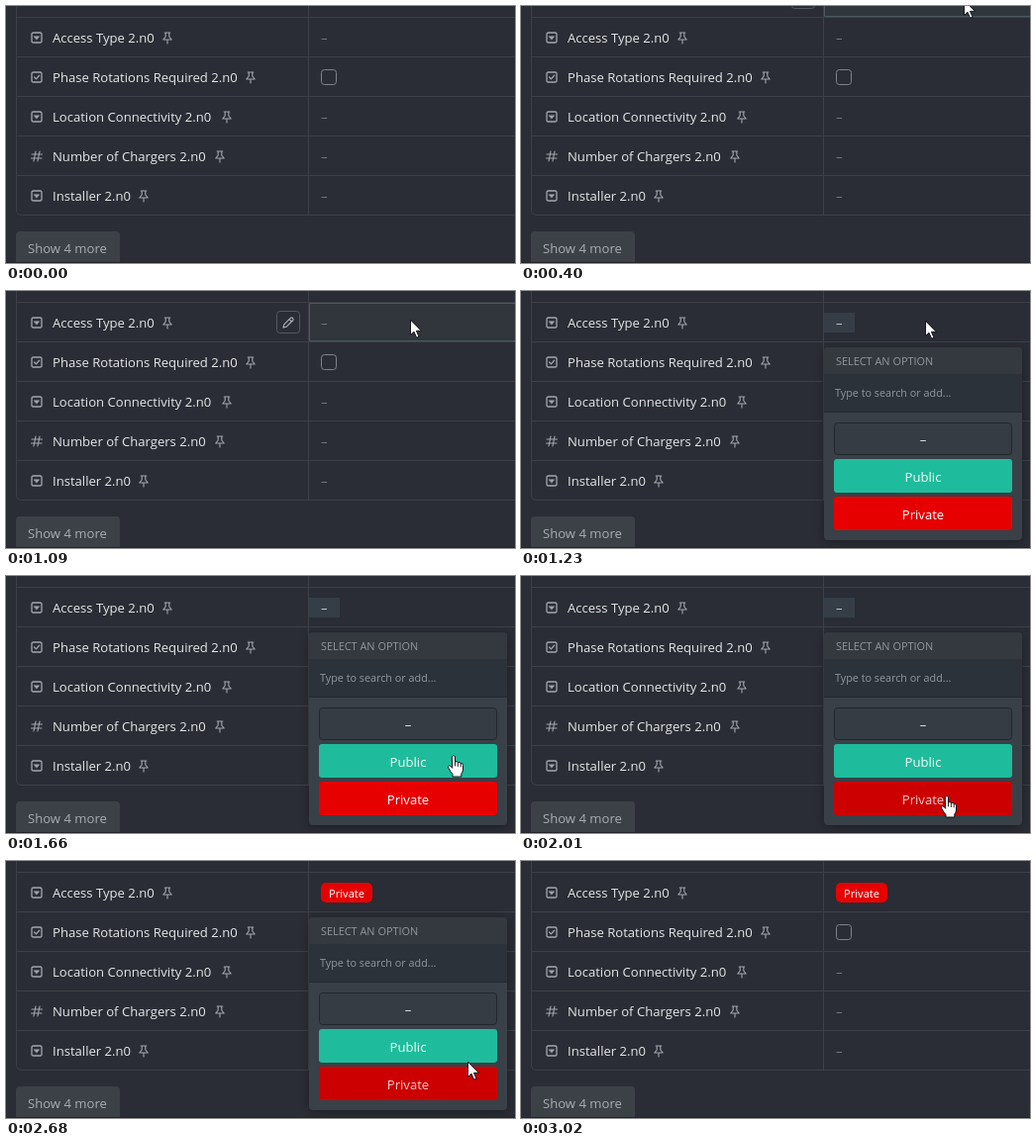
An HTML page with a canvas for the animation above (4.01 s loop, 514 by 260 pixels).

```html
<!DOCTYPE html>
<html lang="en">
<head>
<meta charset="utf-8">
<title>Field picker</title>
<style>
html, body { margin: 0; width: 100%; height: 100%; overflow: hidden; background: #2a2d35; }
canvas { display: block; }
</style>
</head>
<body>
<canvas id="stage" width="514" height="260"></canvas>
<script>
const ctx = document.getElementById('stage').getContext('2d');
const LOOP = 4010;
const SANS = '"Open Sans", "Noto Sans", sans-serif';
const BG = '#2a2d35', LINE = '#3d4047', ICON = '#a3a6ad';

const ROWS = [
  { label: 'Access Type 2.n0', icon: 'select', pin: 163 },
  { label: 'Phase Rotations Required 2.n0', icon: 'check', pin: 247 },
  { label: 'Location Connectivity 2.n0', icon: 'select', pin: 223 },
  { label: 'Number of Chargers 2.n0', icon: 'hash', pin: 216 },
  { label: 'Installer 2.n0', icon: 'select', pin: 139 }
];

const OPEN = 1230, PICK = 2540, CLOSE = 2750, LEAVE = 2820, UNHOVER = 3020;

// Pointer path: time, x, y
const PATH = [
  [190, 500, 188], [400, 447, -6], [470, 441, 13], [680, 417, 27], [880, 415, 27],
  [1090, 408, 29], [1230, 408, 30], [1370, 420, 80], [1510, 445, 146], [1660, 452, 184],
  [1940, 393, 222], [2010, 430, 222], [2410, 430, 222], [2540, 440, 217],
  [2680, 466, 203], [2750, 492, 192], [2820, 520, 188]
];

// Screen refreshes happen in bursts: first, last, count
const BURSTS = [[190, 680, 8], [880, 1370, 8], [1440, 1940, 8], [2010, 2010, 1],
  [2210, 2410, 3], [2540, 2820, 5], [3020, 3020, 1]];
const TICKS = [0];
for (const [a, b, n] of BURSTS)
  for (let i = 0; i < n; i++) TICKS.push(n > 1 ? Math.round((a + (b - a) * i / (n - 1)) / 10) * 10 : a);

function pointer(t) {
  let i = 0;
  while (i < PATH.length - 2 && PATH[i + 1][0] <= t) i++;
  const [t0, x0, y0] = PATH[i], [t1, x1, y1] = PATH[i + 1];
  const k = Math.min(1, Math.max(0, (t - t0) / (t1 - t0)));
  return { x: Math.round(x0 + (x1 - x0) * k), y: Math.round(y0 + (y1 - y0) * k) };
}

function text(s, x, y, color, size = 13.1, align = 'left', weight = 400) {
  ctx.font = `${weight} ${size}px ${SANS}`;
  ctx.textAlign = align;
  ctx.fillStyle = color;
  ctx.fillText(s, x, y);
}

function box(x, y, w, h, r, fill, stroke) {
  ctx.beginPath();
  ctx.roundRect(x, y, w, h, r);
  if (fill) { ctx.fillStyle = fill; ctx.fill(); }
  if (stroke) { ctx.strokeStyle = stroke; ctx.lineWidth = 1; ctx.stroke(); }
}

function rect(x, y, w, h, color) {
  ctx.fillStyle = color;
  ctx.fillRect(x, y, w, h);
}

function shape(d, x, y, fill, stroke, width = 1.2) {
  const p = new Path2D(d);
  ctx.save();
  ctx.translate(x, y);
  ctx.lineJoin = ctx.lineCap = 'round';
  if (fill) { ctx.fillStyle = fill; ctx.fill(p); }
  if (stroke) { ctx.strokeStyle = stroke; ctx.lineWidth = width; ctx.stroke(p); }
  ctx.restore();
}

function fieldIcon(kind, y) {
  if (kind === 'hash') {
    shape('M-1 -5L-3 5M3 -5L1 5M-5 -2H5.5M-5.5 2H5', 31, y, null, ICON, 1.1);
    return;
  }
  shape('M-3.5 -5H3.5Q5 -5 5 -3.5V3.5Q5 5 3.5 5H-3.5Q-5 5 -5 3.5V-3.5Q-5 -5 -3.5 -5Z', 31, y, null, ICON, 1.3);
  if (kind === 'select') shape('M-2.7 -1.2H2.7L0 2Z', 31, y, ICON, ICON, .5);
  else shape('M-2.4 0L-.6 1.9L2.6 -1.8', 31, y, null, ICON, 1.3);
}

function pin(x, y) {
  shape('M-2.8 -5H2.8M-1.8 -5V-1L-4.2 2H4.2L1.8 -1V-5M0 2V6', x, y, null, ICON, 1.1);
}

function hoverRow(i) {
  const top = 11 + 40 * i;
  box(306.5, top + 1.5, 220, 38, 0, '#30363c', '#4a5a60');
  box(273.5, top + 9.5, 23, 22, 3, null, '#535860');
  shape('M-5 5L-4.2 1.8L2.5 -4.9Q3.5 -5.5 4.6 -4.5Q5.5 -3.4 4.9 -2.5L-1.8 4.2ZM1 -3.4L3.4 -1',
    285, top + 21, null, '#b0b4ba', 1.1);
}

function table(hover, picked, open) {
  for (let y = 11; y < 211; y += 40) rect(10, y, 504, 1, LINE);
  ctx.beginPath();
  ctx.moveTo(10.5, 0);
  ctx.lineTo(10.5, 206);
  ctx.quadraticCurveTo(10.5, 211.5, 16, 211.5);
  ctx.lineTo(514, 211.5);
  ctx.strokeStyle = LINE;
  ctx.lineWidth = 1;
  ctx.stroke();
  rect(305, 0, 1, 211, LINE);
  if (hover !== null) hoverRow(hover);

  ROWS.forEach((row, i) => {
    const y = 32 + 40 * i;
    fieldIcon(row.icon, y);
    text(row.label, 47, y + 5, '#e6e7e9');
    pin(row.pin, y);
    if (i === 1) box(318.5, y - 7.5, 15, 15, 3, null, '#80848b');
    else if (i > 0 || !(open || picked)) text('–', 318, y + 5, '#767a82');
  });

  if (picked) {
    box(318, 22, 52, 20, 5, '#e60000');
    text('Private', 344, 37, '#fff', 11.2, 'center');
  } else if (open) {
    rect(306, 22, 31, 20, '#353e46');
    text('–', 318, 37, '#c3c7cb');
  }

  box(10, 228, 105, 34, 4, '#3c4047');
  text('Show 4 more', 22, 250, '#a9adb4');
  rect(0, 259, 514, 1, '#22242a');
}

function menu(dark) {
  ctx.save();
  ctx.shadowColor = 'rgba(0,0,0,.3)';
  ctx.shadowBlur = 10;
  ctx.shadowOffsetY = 2;
  box(306, 57, 200, 195, 4, '#394047');
  ctx.restore();
  box(306, 57, 200, 27, [4, 4, 0, 0], '#33393f');
  rect(306, 84, 200, 38, '#2b323a');
  rect(306, 122, 200, 1, '#22292f');
  text('SELECT AN OPTION', 318, 75, '#92979c', 10.9);
  text('Type to search or add...', 317, 107, '#92989d', 10.8, 'left', 500);
  box(316.5, 133.5, 179, 32, 3, '#353c43', '#20272d');
  text('–', 406, 155, '#e4e6e8', 13.1, 'center');
  box(316, 170, 180, 34, 3, '#1ebc9c');
  text('Public', 406, 193, '#f4fffc', 13.1, 'center');
  box(316, 208, 180, 34, 3, dark ? '#cc0000' : '#e60000');
  text('Private', 406, 231, dark ? '#f3cccc' : '#fff', 13.1, 'center');
}

function arrow(x, y) {
  shape('M.5 .5V15.5L4 12.2L6.6 18.2L9 17.2L6.4 11.3H11.2Z', x, y, '#fff', '#16181c', 1);
}

function hand(x, y) {
  shape('M-1.5 1.5Q0 -.5 1.5 1.5V7Q3.5 6 4.4 7.7Q6.2 6.8 7.2 8.5Q9.5 8 9.5 10.5V15' +
    'Q9.2 17.5 7.8 19V22H-1V19.5Q-3 17.5 -5.2 13.2Q-6 11.2 -4.4 10.8Q-3 10.6 -1.5 13Z',
    x, y, '#fff', '#101214', 1);
  shape('M1.5 7V11M4.4 8V11.5M7.2 9V12', x, y, null, '#101214', .9);
}

function draw(now) {
  const time = now % LOOP;
  const t = TICKS.reduce((last, k) => k <= time ? k : last, 0);
  const p = pointer(t);
  const open = t >= OPEN && t < CLOSE;
  const hovering = t >= 190 && t < UNHOVER && !open;
  rect(0, 0, 514, 260, BG);
  table(hovering ? Math.floor((p.y - 11) / 40) : null, t >= PICK, open);
  if (open) menu(t >= 2010 || (t > 1660 && p.y >= 208));
  if (t >= 190 && t < LEAVE) {
    const onOption = open && t < PICK && p.y >= 133;
    (onOption ? hand : arrow)(p.x, p.y);
  }
}

const start = performance.now();
function frame() {
  draw(performance.now() - start);
  requestAnimationFrame(frame);
}
frame();
</script>
</body>
</html>
```
